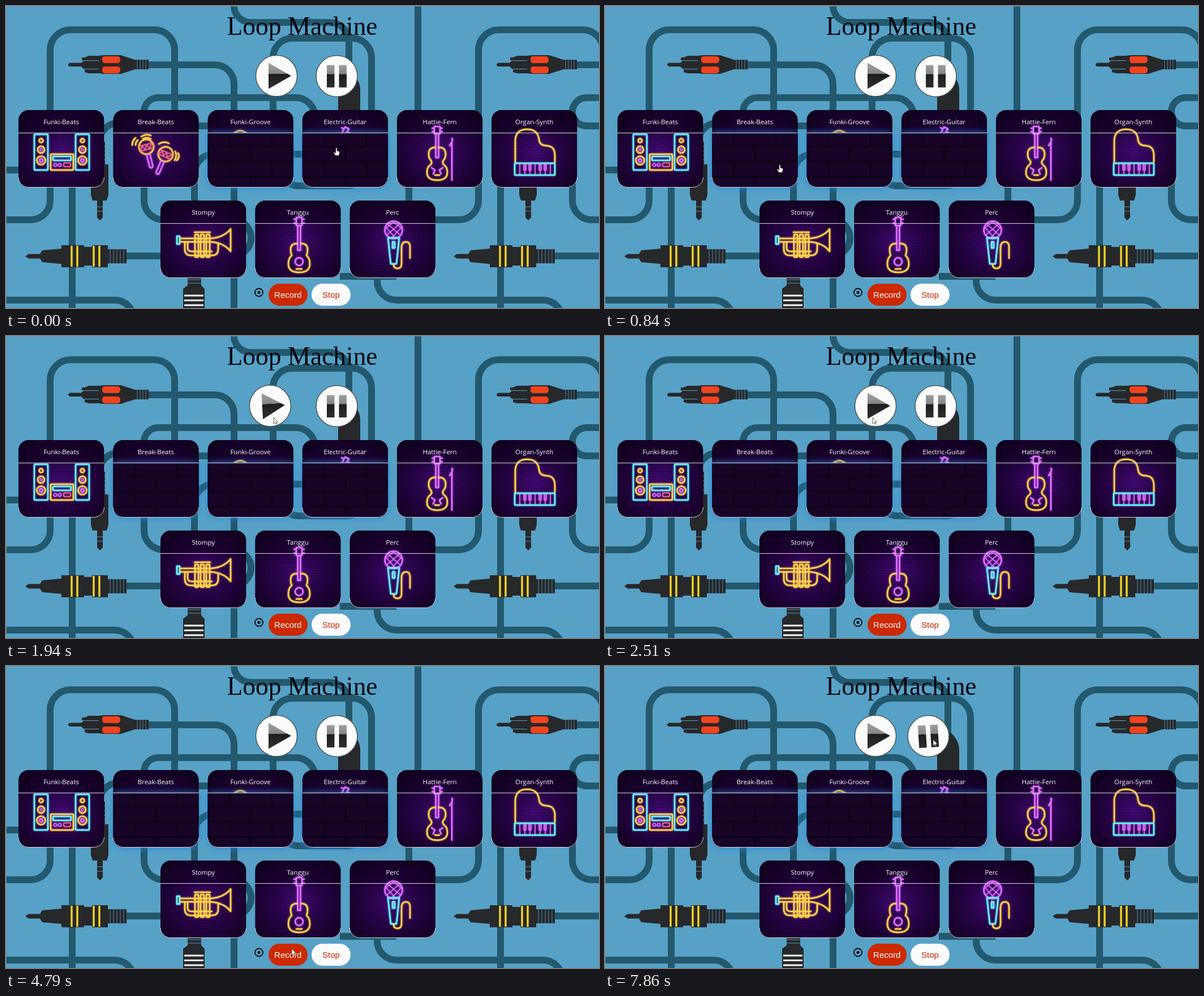
Write an HTML page that moves like this. It is 1048 px wide and 534 px high and loops after 8 s.

```html
<!DOCTYPE html>
<html lang="en">
<head>
<meta charset="utf-8">
<title>Loop Machine</title>
<style>
  html, body { margin: 0; width: 100%; height: 100%; overflow: hidden; background: #57a1c6; }
  svg { display: block; width: 1048px; height: 534px; }
  .cable { fill: none; stroke: #23586d; stroke-width: 12; }
  .plug { fill: #27282a; }
  .title { font: 45.4px "Liberation Serif", serif; fill: #04040f; text-anchor: middle; }
  .label { font: 500 11.5px "Open Sans", sans-serif; fill: #fff; text-anchor: middle; }
  .button { font: 15px "Liberation Sans", sans-serif; text-anchor: middle; }
  .neon { filter: brightness(1.1); }
  .neon * { fill: none; stroke: color-mix(in srgb, currentColor 84%, white); stroke-width: 2.5;
    stroke-linejoin: round; stroke-linecap: round; filter: drop-shadow(0 0 1.5px currentColor); }
  .neon .fine { stroke-width: 1.5; }
  .y { color: #ffb62c; }
  .c { color: #48d8fa; }
  .m { color: #c24cff; }
  .r { color: #ff4f70; }
  .rim { fill: none; stroke: #d9d5e2; stroke-width: 1; }
  .glow { filter: drop-shadow(0 0 6px #2788e0); }
</style>
</head>
<body>
<svg viewBox="0 0 1048 534">
  <defs>
    <radialGradient id="wall" cx=".5" cy=".54" r=".62">
      <stop stop-color="#430a78"/><stop offset=".45" stop-color="#29034a"/><stop offset="1" stop-color="#150026"/>
    </radialGradient>
    <linearGradient id="glyph" gradientUnits="userSpaceOnUse" x1="0" y1="-23" x2="0" y2="23">
      <stop stop-color="#a2a2a2"/><stop offset=".42" stop-color="#858585"/>
      <stop offset=".43" stop-color="#1d1d1d"/><stop offset="1" stop-color="#303030"/>
    </linearGradient>
    <pattern id="bricks" width="14" height="10" patternUnits="userSpaceOnUse">
      <path d="M0 .5H14M0 5.5H14M3.5 0V5M10.5 5V10" stroke="#0d0019" stroke-opacity=".35" fill="none"/>
    </pattern>
    <pattern id="blocks" y="9" width="74" height="54" patternUnits="userSpaceOnUse">
      <rect width="74" height="54" fill="#180426"/>
      <path d="M0 1H74M0 28H74M2 0V28M39 28V54" stroke="#0c0016" stroke-width="3" fill="none"/>
    </pattern>
    <clipPath id="round"><rect width="151.5" height="137" rx="18"/></clipPath>
    <g id="tile">
      <g class="cable">
        <path d="M0 378H44A34 34 0 0 0 78 344V78A36 36 0 0 1 114 42H262A36 36 0 0 1 298 78V200"/>
        <path d="M250 104H369A34 34 0 0 1 403 138V534"/>
        <path d="M210 442H401A32 32 0 0 0 401 378H278A34 34 0 0 1 244 344V250"/>
        <path d="M400 212H269A25 25 0 0 1 269 162H512A34 34 0 0 1 546 196"/>
        <path d="M403 0A30 29 0 0 0 433 29H572A34 34 0 0 1 606 63V124"/>
        <path d="M472 200V91A34 34 0 0 1 506 57H612A34 34 0 0 1 646 91V200"/>
        <path d="M728 0V200M117 300V534M0 290H30M165 245V240A33 33 0 0 1 198 207"/>
        <path d="M712 320V344A34 34 0 0 0 746 378H757M333 490V296A34 34 0 0 1 367 262H560M488 290A28 28 0 0 0 516 318H604A28 28 0 0 0 632 290"/>
        <path d="M590 478H690M656 478V486A34 34 0 0 0 690 520H757M0 520H192A34 34 0 0 1 226 554"/>
      </g>
      <g class="plug">
        <path d="M110 104Q110 100.500 115 100.500H133L138 96H134V91H139L146 88H164L172 87H203L228 95H252V112H228L203 120H172L164 119H146L139 117V112H138L133 107H115Q110 107 110 104"/>
        <path d="M34 442.500L40 438.500H60L64 432L98 429V423H138V426H152V423H180V430H213V455H180V462H152V459H138V462H98V456L64 453L60 446.500H40Z"/>
        <path d="M157 240H175V280H181V334L178 344H171V374L166 379L161 374V344H153L150 334V280H157Z"/>
        <path d="M600 118H611Q626 132 626 148V200H587V134Z"/>
        <path d="M321 478H345V494L351 500V534H313V500L321 494Z"/>
      </g>
      <path d="M170 93Q170 89 174 89H198Q202 90 202 95T198 101H174Q170 100 170 95M170 113Q170 107 174 107H198Q202 108 202 113T198 119H174Q170 118 170 113" fill="#f0431e"/>
      <path d="M116 424V461M126 424V461M155 424V461M165 424V461" stroke="#f0cf2a" stroke-width="3.500"/>
      <path d="M315 512H349M315 520.500H349M315 529H349" stroke="#f7f7f7" stroke-width="3"/>
      <path d="M232 94V113M237 94V113M242 94V113M247 94V113M184 429V456M190 429V456M196 429V456M202 429V456M208 429V456M320 484H346M320 490H346M160 355H172M160 363H172M156 248H176M156 256H176M156 264H176M156 272H176" stroke="#57a1c6" stroke-opacity=".6" stroke-width="1.300"/>
      <path d="M138 96.500H164M138 111.500H164" stroke="#57a1c6" stroke-width="1.200"/>
    </g>
    <path id="arrow" d="M0 0V11L2.600 8.600L4.400 12L6 11.200L4.300 8H7.500Z" fill="#fff" stroke="#222" stroke-width=".7"/>
    <path id="hand" d="M-1.300-6.500Q0-8 1.200-6.500V-1.800L5-1Q6 0 5.500 2L4.300 6.500H-1.500L-5 1.500Q-4.500 0-3 .8L-1.300 2Z" fill="#fff" stroke="#181020" stroke-width=".8"/>
    <path id="beam" d="M-2-4H2M0-4V4M-2 4H2" fill="none" stroke="#8a93a0" stroke-width="1"/>
  </defs>

  <rect width="1048" height="534" fill="#57a1c6"/>
  <use href="#tile"/>
  <use href="#tile" x="757"/>
  <path d="M0 .5H1048M.5 0V534" stroke="#8199a5" stroke-opacity=".7"/>
  <text class="title" x="523.500" y="51">Loop Machine</text>

  <g id="play">
    <circle r="36.500" fill="#fbfbfb" stroke="#48565e" stroke-width="1.500"/>
    <path d="M-14-23L26 0L-14 23Z" fill="url(#glyph)"/>
  </g>
  <g id="pause">
    <circle r="36.500" fill="#fbfbfb" stroke="#48565e" stroke-width="1.500"/>
    <path d="M-17.500-19.500H-4V20H-17.500ZM4-19.500H17.500V20H4Z" fill="url(#glyph)"/>
  </g>
  <g id="cards"></g>

  <circle cx="447" cy="506.500" r="7" fill="none" stroke="#080810" stroke-width="1.800"/>
  <circle cx="447" cy="506.500" r="2.500" fill="#080810"/>
  <g class="button">
    <rect x="464" y="491" width="69" height="39" rx="19.500" fill="#cc2900"/>
    <text x="498.300" y="516" fill="#fff">Record</text>
    <rect x="540" y="491" width="69" height="39" rx="19.500" fill="#fcfcfc"/>
    <text x="574.500" y="516" fill="#cc2900">Stop</text>
  </g>
  <use id="cursor"/>
</svg>
<script>
const $ = id => document.getElementById(id);
const line = (color, d) => `<path class="${color}" d="${d}"/>`;
const ring = (color, x, y, r) => `<circle class="${color}" cx="${x}" cy="${y}" r="${r}"/>`;
const box = (color, x, y, w, h) => `<rect class="${color}" x="${x}" y="${y}" width="${w}" height="${h}" rx="1"/>`;

const speaker = x => box('c', x - 12, 227, 24, 63) + ring('y', x, 238, 3.5) +
  ring('y', x, 254, 6) + ring('m fine', x, 254, 2) + ring('y', x, 273, 7.5) + ring('m', x, 273, 3);

// The group itself must not add a second glow.
const maraca = (x, y, turn) => `<g style="filter:none" transform="translate(${x} ${y}) rotate(${turn})">` +
  ring('y', 0, 0, 13) + line('r fine', 'M-12-4H12M-12 5H12M-11 4L-7-3L-3 4L1-3L5 4L10-3') +
  line('m', 'M-3 14L-3 36Q0 41 3 36L3 14') + '</g>';

const keys = [0, 1, 2, 3, 4, 5, 6].map(i => line('m fine', `M${908 + i * 9} 279V298`) +
  (i % 3 ? line('m fine', `M${906 + i * 9} 279V290H${910 + i * 9}V279`) : '')).join('');

const valves = [337, 347, 357].map(x =>
  box('y', x - 3, 404, 6, 40) + line('y', `M${x - 4} 400H${x + 4}`)).join('');

const icons = {
  'Funki-Beats': speaker(62) + speaker(135) + box('y', 79, 262, 40, 28) + box('c', 83, 266, 32, 7) +
    ring('m fine', 87, 281, 2.8) + ring('m fine', 95, 281, 2.8) + box('r fine', 102, 277.5, 12, 6.5),
  'Break-Beats': maraca(248, 249, -14) + maraca(282, 262, 23) +
    line('y', 'M223 246Q223 238 229 233M229 246Q229 241 233 237M239 231Q247 225 256 229M242 235Q249 231 256 235M299 257Q303 265 298 273M304 260Q308 267 302 273M270 244Q279 238 288 243'),
  'Funki-Groove': line('y', 'M402 226Q414 215 426 226'),
  'Electric-Guitar': line('m', 'M593 226L599 214L606 217L600 227M596 217L593 215M603 222L607 224'),
  'Hattie-Fern': line('m', 'M757 226V213H767V226ZM753 216H757M753 222H757M767 216H771M767 222H771M759.500 226V268H764.500V226M788 308V240L784 247M788 240Q790 236 788 234') +
    line('y', 'M759 250Q747 250 747 262Q747 269 751 273Q754 277 750 281Q744 285 744 294Q744 308 762 308T780 294Q780 285 774 281Q770 277 773 273Q777 269 777 262Q777 250 765 250') +
    line('m', 'M752 286L758 290L755 297M772 286L766 290L769 297') + line('y', 'M758 299H766'),
  'Organ-Synth': line('y', 'M900 276V236Q902 218 921 218Q940 218 942 236Q943 247 956 247Q970 248 970 264V276') +
    keys + box('c', 899, 278, 71, 21),
  'Stompy': line('c', 'M302 407V421H307V407Z') +
    line('y', 'M308 411H362Q386 409 397 394V434Q386 419 362 417H308M316 418V430Q316 441 327 441H364Q375 441 375 430V420M321 418V428Q321 434 328 434H364') + valves,
  'Tanggu': line('m', 'M513 388V374H523V388ZM509 377H513M509 384H513M523 377H527M523 384H527M515.500 388V432H520.500V388') +
    line('y', 'M514 420Q503 420 503 431Q503 437 505 441Q499 446 499 456Q499 471 518 471T537 456Q537 446 531 441Q533 437 533 431Q533 420 522 420') +
    ring('m', 518, 452, 7) + line('y', 'M513 465H523'),
  'Perc': ring('m', 685, 396, 15.5) +
    line('m fine', 'M671 391L688 410M674 385L697 405M684 381L700 394M699 391L682 410M696 385L673 405M686 381L670 394') +
    line('c', 'M675 410H695L690 456H680ZM683 417H687V428H683Z') +
    line('y', 'M685 457Q685 464 692 464Q699 464 699 456V428Q699 417 707 417Q714 417 714 426V446'),
};
const BODY = 'M0 40.500H151.500V119A18 18 0 0 1 133.500 137H18A18 18 0 0 1 0 119Z';

$('cards').innerHTML = Object.keys(icons).map((name, i) => {
  const x = i < 6 ? 22 + i * 167.2 : 273 + (i - 6) * 167.2;
  const y = i < 6 ? 184 : 344;
  const place = `transform="translate(${x} ${y})"`;
  return `<g ${place} clip-path="url(#round)"><rect width="151.5" height="137" fill="url(#wall)"/>
      <rect width="151.5" height="137" fill="url(#bricks)"/><rect width="151.5" height="40" fill="#0d0018" opacity=".35"/></g>
    <g class="neon">${icons[name]}</g>
    <g ${place}>
      <path id="lit${i}" class="glow" d="${BODY}" fill="url(#blocks)"/>
      <path class="rim" d="M0 40.500H151.500M0 119A18 18 0 0 0 18 136.500H133.500A18 18 0 0 0 151.500 119"/>
      <text class="label" x="75.7" y="25">${name}</text>
    </g>`;
}).join('');

// Each row: start time, then values held until the next row.
const cursorSteps = [
  [0, 'hand', 584, 258], [120, 'hand', 542, 266], [270, 'hand', 361, 292], [420, 'hand', 314, 290],
  [570, 'hand', 309, 288], [1270, 'hand', 371, 235], [1390, 'arrow', 427, 183], [1540, 'arrow', 464, 160],
  [1670, 'arrow', 473, 144], [3380, 'arrow', 473, 141], [3530, 'arrow', 473, 137], [3650, 'arrow', 473, 135],
  [3800, 'arrow', 473, 134], [4520, 'arrow', 480, 212], [4670, 'arrow', 496, 400], [4790, 'arrow', 505, 500],
  [7500, 'beam', 535, 344], [7620, 'arrow', 563, 220], [7740, 'arrow', 577, 145], [7860, 'arrow', 580, 130],
];
const playSteps = [
  [0, 0, 0], [1670, -18.7, -5], [1820, 9, 1.9], [1940, -11.2, -3],
  [2090, 7.5, 2], [2210, -3.7, -1], [2360, -1, -0.3], [2510, 0, 0],
];
const pauseSteps = [[0, 0, 0], [7740, -3, -0.8], [7860, -13, -3.5]];
const litFrom = { 1: 840, 2: 0, 3: 0 };
const LOOP = 8000;

const stepAt = (steps, t) => steps.findLast(([start]) => start <= t);

function wobble(id, steps, t, x, y) {
  const [, dx, turn] = stepAt(steps, t);
  $(id).setAttribute('transform', `translate(${x + dx} ${y}) rotate(${turn})`);
}

function render(t) {
  const [, shape, x, y] = stepAt(cursorSteps, t);
  $('cursor').setAttribute('href', '#' + shape);
  $('cursor').setAttribute('transform', `translate(${x} ${y})`);
  wobble('play', playSteps, t, 478, 123.5);
  wobble('pause', pauseSteps, t, 584.5, 124);
  for (let i = 0; i < 9; i++) $('lit' + i).style.display = t >= litFrom[i] ? '' : 'none';
}

const begin = performance.now();
function tick() {
  render((performance.now() - begin) % LOOP);
  requestAnimationFrame(tick);
}
tick();
</script>
</body>
</html>
```
